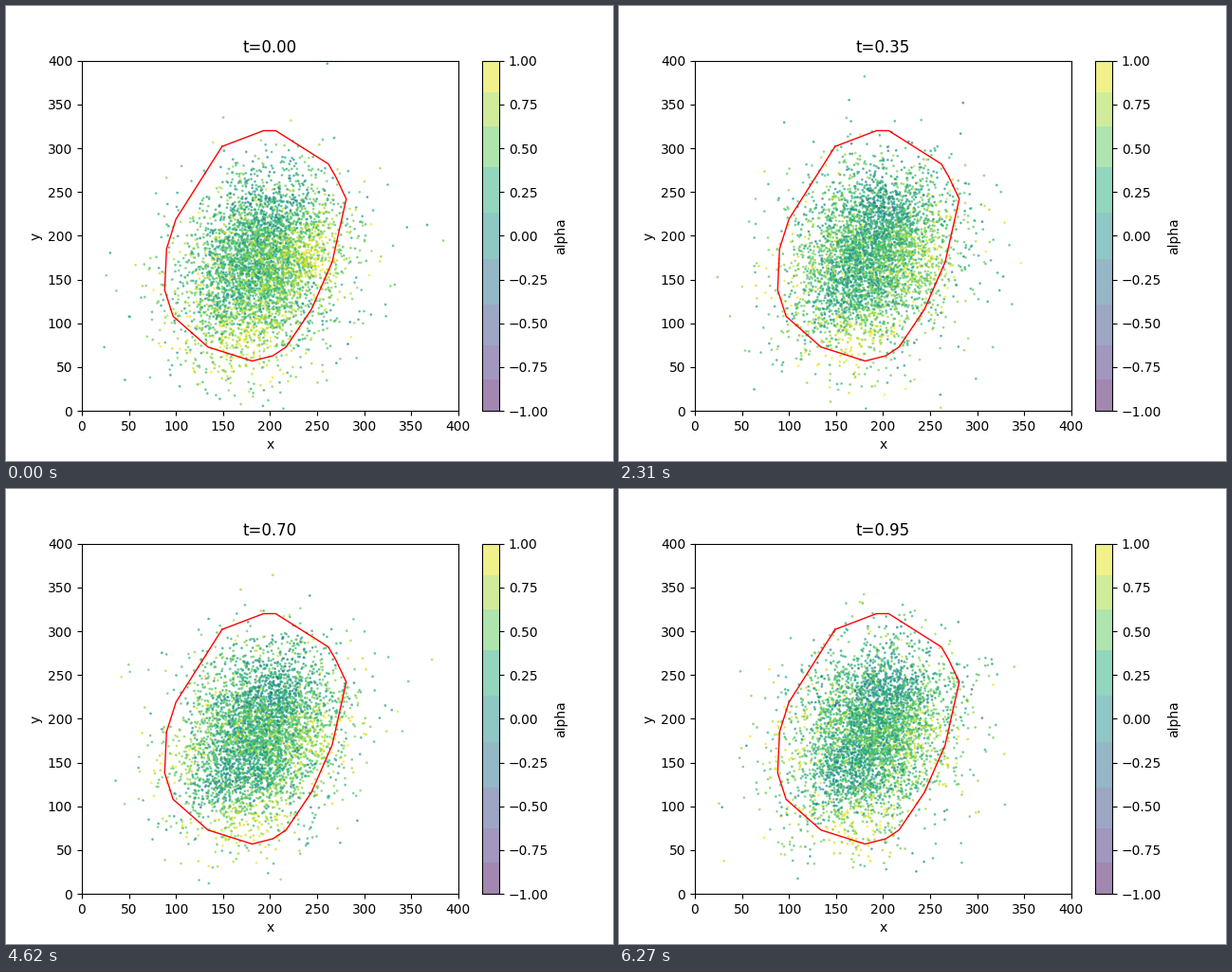
Recreate the animation shown at these times as a matplotlib script. Size 640 by 480 pixels, loop 6.6 s.

```python
import numpy as np
import matplotlib.pyplot as plt
from matplotlib.animation import FuncAnimation
from matplotlib.cm import ScalarMappable
from matplotlib.colors import ListedColormap, Normalize

FRAMES, INTERVAL = 20, 330
STEP = 0.05
COUNT = 4400

OUTLINE = np.array([
    (149, 302), (193, 320), (206, 320), (262, 282), (270, 267), (281, 242),
    (266, 170), (244, 116), (217, 73), (203, 63), (181, 57), (134, 73),
    (97, 108), (88, 138), (90, 185), (100, 219), (149, 302),
])

# x, y, height at the start, height at the end
BUMPS = [
    (205, 235, -0.24, -0.30),
    (255, 180, 0.34, 0.18),
    (167, 75, 0.42, 0.46),
    (153, 125, -0.14, -0.42),
    (95, 150, 0.12, 0.32),
]
RADIUS = 32


def mix(a, b, k):
    return a + (np.asarray(b) - a) * k


def field(pts, k):
    value = np.full(len(pts), 0.43)
    for x, y, start, end in BUMPS:
        dist = np.hypot(pts[:, 0] - x, pts[:, 1] - y) / RADIUS
        value += mix(start, end, k) * np.exp(-dist ** 2 / 2)
    return value


def sample(i):
    """Scatter points around a slanted spine that rises with time."""
    rng = np.random.default_rng(100 + i)
    k = 1 - np.exp(-i * STEP / 0.3)
    foot = mix((150, 76), (152, 96), k)
    head = mix((211, 214), (208, 228), k)
    along = rng.random((COUNT, 1)) ** 0.55
    spread = rng.uniform(28, 50, (COUNT, 1))
    pts = mix(foot, head, along) + rng.normal(size=(COUNT, 2)) * spread
    value = field(pts, k) + rng.normal(0, 0.25, COUNT)
    return pts, np.clip(value, -1, 1)


def banded_cmap(bands=9):
    u = np.linspace(-1, 1, bands + 1)
    edges = u + 0.07 * np.sin(np.pi * u)
    mids = (edges[:-1] + edges[1:]) / 2
    band = np.searchsorted(edges[1:-1], np.linspace(-1, 1, 256))
    return ListedColormap(plt.cm.viridis((mids[band] + 1) / 2))


fig, ax = plt.subplots(figsize=(6.4, 4.8), dpi=100)
norm = Normalize(-1, 1)
points, values = sample(0)
dots = ax.scatter(*points.T, c=values, s=1, alpha=0.6, cmap="viridis",
                  norm=norm)
ax.plot(*OUTLINE.T, color="red", lw=1)
ax.set(xlim=(0, 400), ylim=(0, 400), xlabel="x", ylabel="y",
       xticks=range(0, 401, 50), yticks=range(0, 401, 50))
title = ax.set_title("t=0.00")
fig.colorbar(ScalarMappable(norm, banded_cmap()), ax=ax, alpha=0.5,
             label="alpha", ticks=np.linspace(-1, 1, 9))


def update(i):
    pts, value = sample(i)
    dots.set_offsets(pts)
    dots.set_array(value)
    title.set_text(f"t={i * STEP:.2f}")
    return dots, title


anim = FuncAnimation(fig, update, frames=FRAMES, interval=INTERVAL,
                     init_func=lambda: update(0), repeat=True)
plt.show()
```
